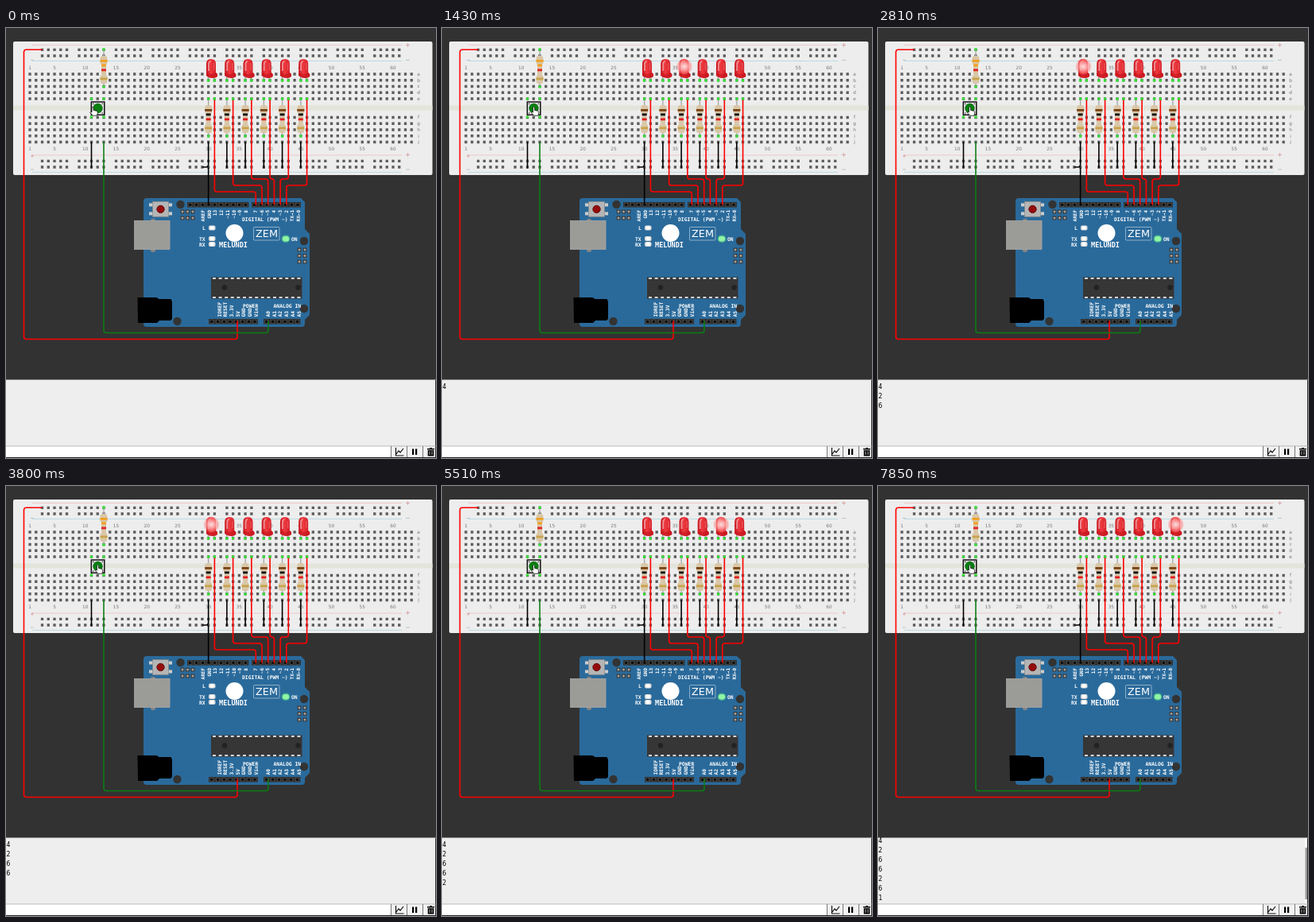
An HTML page for the animation above (7950 ms loop, 541 px wide and 541 px high).

```html
<!DOCTYPE html>
<html lang="en">
<head>
<meta charset="utf-8">
<title>Electronic dice on a breadboard</title>
<style>
html, body { margin: 0; width: 100%; height: 100%; overflow: hidden; background: #323232; }
svg { display: block; width: 541px; height: 541px; }
.mono { font-family: "DejaVu Sans Mono", monospace; }
.sans { font-family: "DejaVu Sans", sans-serif; }
.label { font-size: 5.8px; fill: #777; text-anchor: middle; }
.silk { font-size: 6.4px; font-weight: bold; fill: #fff; }
.mid { text-anchor: middle; }
</style>
</head>
<body>
<svg id="stage" viewBox="0 0 541 541">
  <defs>
    <radialGradient id="shine">
      <stop offset="0" stop-color="#fff" stop-opacity=".85"/>
      <stop offset=".45" stop-color="#ffb0b0" stop-opacity=".8"/>
      <stop offset=".75" stop-color="#ff8080" stop-opacity=".6"/>
      <stop offset="1" stop-color="#ff8080" stop-opacity="0"/>
    </radialGradient>
    <linearGradient id="dome">
      <stop offset="0" stop-color="#c8141c"/>
      <stop offset=".4" stop-color="#ee3a40"/>
      <stop offset="1" stop-color="#cf151d"/>
    </linearGradient>
    <clipPath id="log"><path d="M0 442h541v84H0z"/></clipPath>
  </defs>
</svg>
<script>
const LOOP = 7950, PITCH = 7.745;
const rolls = [4, 2, 6, 6, 2, 6, 1];
const rollTime = i => 560 + 1010 * i;
const LIGHT_DELAY = 170;

const col = c => 22.3 + PITCH * c;
const range = n => [...Array(n).keys()];
const each = (n, fn) => range(n).map(fn).join('');
const rect = (x, y, w, h, fill, more = '') =>
  `<rect x="${x}" y="${y}" width="${w}" height="${h}" fill="${fill}" ${more}/>`;
const disc = (x, y, r, fill, more = '') =>
  `<circle cx="${x}" cy="${y}" r="${r}" fill="${fill}" ${more}/>`;
const path = (d, fill, more = '') => `<path d="${d}" fill="${fill}" ${more}/>`;
const line = (d, color, width = 1) => path(d, 'none', `stroke="${color}" stroke-width="${width}"`);
const text = (x, y, s, cls, more = '') => `<text x="${x}" y="${y}" class="${cls}" ${more}>${s}</text>`;
const dot = (x, y) => disc(x, y, 1.8, '#2fe62f');
const upright = (x, y, s, anchor, size = 6) =>
  text(0, 0, s, 'mono silk', `style="font-size:${size}px;text-anchor:${anchor}" transform="translate(${x} ${y}) rotate(-90)"`);

// Wire through points, with rounded corners
function wire(color, ...pts) {
  let d = 'M' + pts[0];
  for (let i = 1; i < pts.length - 1; i++) {
    const [x, y] = pts[i];
    const near = ([a, b]) => {
      const len = Math.hypot(a - x, b - y), k = Math.min(3, len / 2) / len;
      return [x + (a - x) * k, y + (b - y) * k];
    };
    d += `L${near(pts[i - 1])}Q${x} ${y} ${near(pts[i + 1])}`;
  }
  return path(d + 'L' + pts.at(-1), 'none', `stroke="${color}" stroke-width="1.6" stroke-linecap="round"`);
}

function breadboard() {
  let holes = '';
  const hole = (x, y) => holes += `M${x - 1.65} ${y - 1.65}h3.3v3.3h-3.3z`;
  const rows = [...range(5).map(i => 58 + 7.75 * i), ...range(5).map(i => 112.5 + 7.75 * i)];
  for (const y of rows) for (let c = 1; c <= 63; c++) hole(col(c), y);
  for (const y of [27.3, 35, 167.3, 175])
    for (let g = 0; g < 10; g++) for (let i = 0; i < 5; i++) hole(col(3 + 6 * g + i), y);
  const numbers = [1, ...range(12).map(i => 5 * i + 5)];
  return rect(9, 17, 527.5, 168, '#ededed', 'rx="2"') +
    rect(9, 97.5, 527.5, 6, '#e3e4da') +
    line('M33 21.5H498M33 160H498', '#eec8c8') +
    line('M33 41.5H498M33 181.5H498', '#b9dce4') +
    line('M503 21.5h5m-2.5-2.5v5M503 159.5h5m-2.5-2.5v5M31 161h4m-2-2v4', '#d79a9a', .8) +
    line('M503 40.5h5M503 178h5M31 40.5h4M31 178h4', '#a9bcc4', .8) +
    path(holes, '#5c5c5c') +
    numbers.map(n => [52, 153.5].map(y => text(col(n), y, n, 'sans label')).join('')).join('') +
    rows.map((y, i) => text(519, y + 1.8, 'abcdefghij'[i], 'sans label')).join('');
}

function resistor(x, y, bands) {
  const colors = bands.map((c, i) => rect(x - (i % 3 ? 3 : 4.5), y + [5, 10.5, 16.5, 27.5][i], i % 3 ? 6 : 9, 2.8, c));
  return line(`M${x} ${y - 8}V${y + 39}`, '#aaa', 1.4) +
    path(`M${x - 2.5} ${y}h5q2 1 2 4v4q0 2-1.5 3v13q1.5 1 1.5 3v4q0 3-2 4h-5q-2-1-2-4v-4q0-2 1.5-3v-13q-1.5-1-1.5-3v-4q0-3 2-4z`,
      '#d9c7a8') + colors.join('') + dot(x, y - 8) + dot(x, y + 39);
}

const led = x =>
  line(`M${x - 3.5} 61v5M${x + 3.5} 60v3l1 3`, '#999', 1.4) + dot(x - 3.5, 66) + dot(x + 4.3, 66) +
  path(`M${x - 6} 58V45q0-6 6-6t6 6v11l2 2v3q-3 2.5-7 2t-7-3z`, 'url(#dome)') +
  path(`M${x - 6} 56q6 4 12 0l2 2v3q-3 2.5-7 2t-7-3z`, '#c4161d', 'opacity=".65"') +
  path(`M${x - 4} 44q1-3 4-3l-1 2q-1 1-1 3v8h-2z`, '#fff', 'opacity=".45"') +
  path(`M${x + 3} 44h1.5v9H${x + 3}z`, '#fff', 'opacity=".2"');

function header(x, y, n) {
  return rect(x, y, n * 7.74, 6.6, '#303030') +
    each(n, i => rect(x + 1.8 + i * 7.74, y + 1.4, 4, 3.8, '#0c0c0c', 'stroke="#666" stroke-width=".5"'));
}

function controller() {
  const pins = (xs, ys) => xs.map(x => ys.map(y =>
    rect(x - 2.4, y - 2.4, 4.8, 4.8, '#383838') + disc(x, y, 1.5, '#a8a29c')).join('')).join('');
  const lamp = y => rect(255, y, 8.5, 6, '#ddd', 'rx="2"') + rect(257, y + 1, 4.5, 4, '#fff');
  const top = ['AREF', 'GND', '13', '12', '~11', '~10', '~9', '8'];
  const digital = ['7', '~6', '~5', '4', '~3', '2', 'TX→1', 'RX←0'];
  const power = ['IOREF', 'RESET', '3.3V', '5V', 'GND', 'GND', 'Vin'];
  return path('M177 214H371l5 5v34l6 6v102l-6 6v5q0 4-4 4H177q-4 0-4-4V218q0-4 4-4z', '#2a6a9b') +
    [[219.5, 222], [215.5, 369], [375, 268], [375, 353]].map(p => disc(...p, 5.2, '#333')).join('') +
    // reset button, USB socket and power jack
    rect(180, 220.5, 29, 4, '#ccc') + rect(180, 231.5, 29, 4, '#ccc') +
    rect(184.5, 218.5, 20, 19, '#b5b5b5', 'stroke="#888" stroke-width=".7"') + disc(194.5, 228, 4.7, '#960c0c', 'stroke="#621010"') +
    rect(182, 240, 6, 42, '#858585', 'rx="2"') +
    rect(161.5, 242.5, 44.5, 36, '#9b9b98', 'stroke="#aaa9a6" stroke-width=".8"') +
    path('M165.5 339h24l3 2h15l1.5 3v22l-2 2h-14l-3 3h-24z', '#000') +
    header(228, 219, 10) + header(309, 219, 8) + header(255, 366, 8) + header(324, 366, 6) +
    pins([222, 228.5, 235], [231, 239]) + pins([369, 376], [279, 286.5, 294]) +
    top.map((s, i) => upright(250 + i * PITCH, 229, s, 'end')).join('') +
    digital.map((s, i) => upright(316 + i * PITCH, 229, s, 'end')).join('') +
    power.map((s, i) => upright(270.5 + i * PITCH, 363.5, s, 'start', 6.2)).join('') +
    each(6, i => upright(331.8 + i * PITCH, 363.5, 'A' + i, 'start', 6.2)) +
    text(297, 243, 'DIGITAL (PWM ~)', 'mono silk') +
    text(247, 254, 'L', 'mono silk') + text(243, 267.5, 'TX', 'mono silk') + text(243, 274.5, 'RX', 'mono silk') +
    lamp(248.5) + lamp(262) + lamp(269) +
    disc(287.5, 258, 11, '#fff') +
    text(286, 276, 'MELUNDI', 'mono silk mid', 'style="font-size:8.5px"') +
    rect(311.5, 250.5, 32.5, 16.5, 'none', 'stroke="#a6c0d3" stroke-width=".8" rx="1"') +
    text(328, 263.2, 'ZEM', 'sans mid', 'font-size="12.8" fill="#fff"') +
    rect(346.5, 260.5, 11, 9.5, '#55e888', 'rx="4.7" opacity=".5"') + rect(348, 262, 8, 6.5, '#91f5a5', 'rx="3"') +
    text(359, 267.8, 'ON', 'mono silk') +
    // microcontroller chip
    rect(258, 313.5, 114.5, 27, '#363636') +
    each(15, i => [314, 338].map(y => rect(260 + i * 7.6, y, 4, 2, '#d4d4d4')).join('')) +
    disc(275, 326.5, 3.2, '#222') + disc(367.5, 326.5, 3.2, '#222') +
    text(298, 351.5, 'POWER', 'mono silk') + text(336.5, 351.5, 'ANALOG IN', 'mono silk');
}

function wires() {
  const red = '#f00', bends = [206, 198, 190, 190, 190, 198];
  return wire(red, [45, 27.3], [22.5, 27.3], [22.5, 391.5], [291, 391.5], [291, 369]) +
    wire('#0a7d14', [123, 144], [123, 383.5], [330, 383.5], [330, 369]) +
    wire('#000', [col(11), 144], [col(11), 176]) +
    wire('#000', [col(30), 144], [col(30), 175], [247.5, 175]) +
    wire('#000', [col(30), 176], [col(30), 222]) +
    each(5, i => wire('#000', [col(33 + 3 * i), 144], [col(33 + 3 * i), 176])) +
    bends.map((y, i) => {
      const x = col(31 + 3 * i), pin = 314.3 + i * 7.7;
      return wire(red, [x, 89], [x, y], [pin, y], [pin, 222]) + dot(x, 89);
    }).join('');
}

const button = () =>
  [107.5, 123].map(x => dot(x, 89) + dot(x, 112)).join('') +
  rect(107.3, 93, 16.5, 16.3, '#e8e8e8', 'stroke="#111" stroke-width="1.5"') +
  [109.7, 121.3].map(x => disc(x, 95.4, .8, '#333') + disc(x, 107, .8, '#333')).join('') +
  disc(115.5, 101, 5.9, '#0a8010', 'stroke="#06570b" stroke-width=".6"');

const panel = () =>
  rect(0, 442.5, 541, 98.5, '#eee') +
  `<g clip-path="url(#log)"><g id="lines">` +
  rolls.map((n, i) => text(.5, 453.5 + 12 * i, n, 'mono', 'font-size="8" fill="#000"')).join('') + '</g></g>' +
  `<g id="bar">${rect(537, 443, 3, 83, '#fafafa')}${rect(537.5, 455, 2.5, 65, '#999')}</g>` +
  line('M540.5 443V541', '#333') +
  rect(0, 526, 484, 14, '#fff') + rect(485, 526, 55, 14, '#f2f2f2') +
  line('M0 526H541', '#aaa', .8) + line('M484.5 526V541M504.5 526V541M524.5 526V541', '#777') +
  line('M0 540.5H541', '#222') +
  line('M490.5 528v10h10M491 536l3-4 2 2 4-5', '#111', 1.2) +
  path('M511 529.5h2.2v7.5H511zM515 529.5h2.2v7.5H515z', '#000') +
  path('M530 529h3l.6-1h1.8l.6 1h3v1.5h-9zM530.7 531.3h7.6v7.2h-7.6z', '#000') +
  line('M533 532.5v4.5M536 532.5v4.5', '#eee', .8);

const hand = path('M-1.2 0q1.2-1.5 2.4 0v4l5 1.2q1.4.5 1.2 2L6.5 12H.2L-4 7.2q.8-1.4 2.8 0z', '#fff',
  'id="hand" stroke="#111" stroke-width=".9" stroke-linejoin="round" transform="scale(.8)"');

const ledX = i => 258 + i * 3 * PITCH;
const $ = id => document.getElementById(id);
$('stage').insertAdjacentHTML('beforeend',
  rect(0, 0, 541, 443, '#323232') + breadboard() + controller() +
  resistor(123, 35, ['#f0a020', '#f0a020', '#df2424', '#c9a34d']) +
  each(6, i => resistor(col(30 + 3 * i), 97, ['#7a4314', '#111', '#e21d1d', '#c9a34d']) + led(ledX(i))) +
  each(6, i => disc(ledX(i) + .5, 48.5, 10.5, 'url(#shine)', 'class="glow"')) +
  wires() + button() + panel() + hand);

const glows = document.querySelectorAll('.glow');
const rows = [...$('lines').children];
const show = (node, on) => node.setAttribute('visibility', on ? 'visible' : 'hidden');

function draw() {
  const t = performance.now() % LOOP;
  const count = rolls.filter((n, i) => t >= rollTime(i)).length;
  const lit = count && t >= rollTime(count - 1) + LIGHT_DELAY ? 6 - rolls[count - 1] : -1;
  const full = count === rolls.length;
  rows.forEach((row, i) => show(row, i < count));
  glows.forEach((glow, i) => show(glow, i === lit));
  show($('bar'), full);
  $('lines').setAttribute('transform', `translate(0 ${full ? -5 : 0})`);
  const x = 109 + 6.5 * Math.min(1, t / 330);
  $('hand').setAttribute('transform', `translate(${x} 100) scale(.85)`);
  requestAnimationFrame(draw);
}
draw();
</script>
</body>
</html>
```
